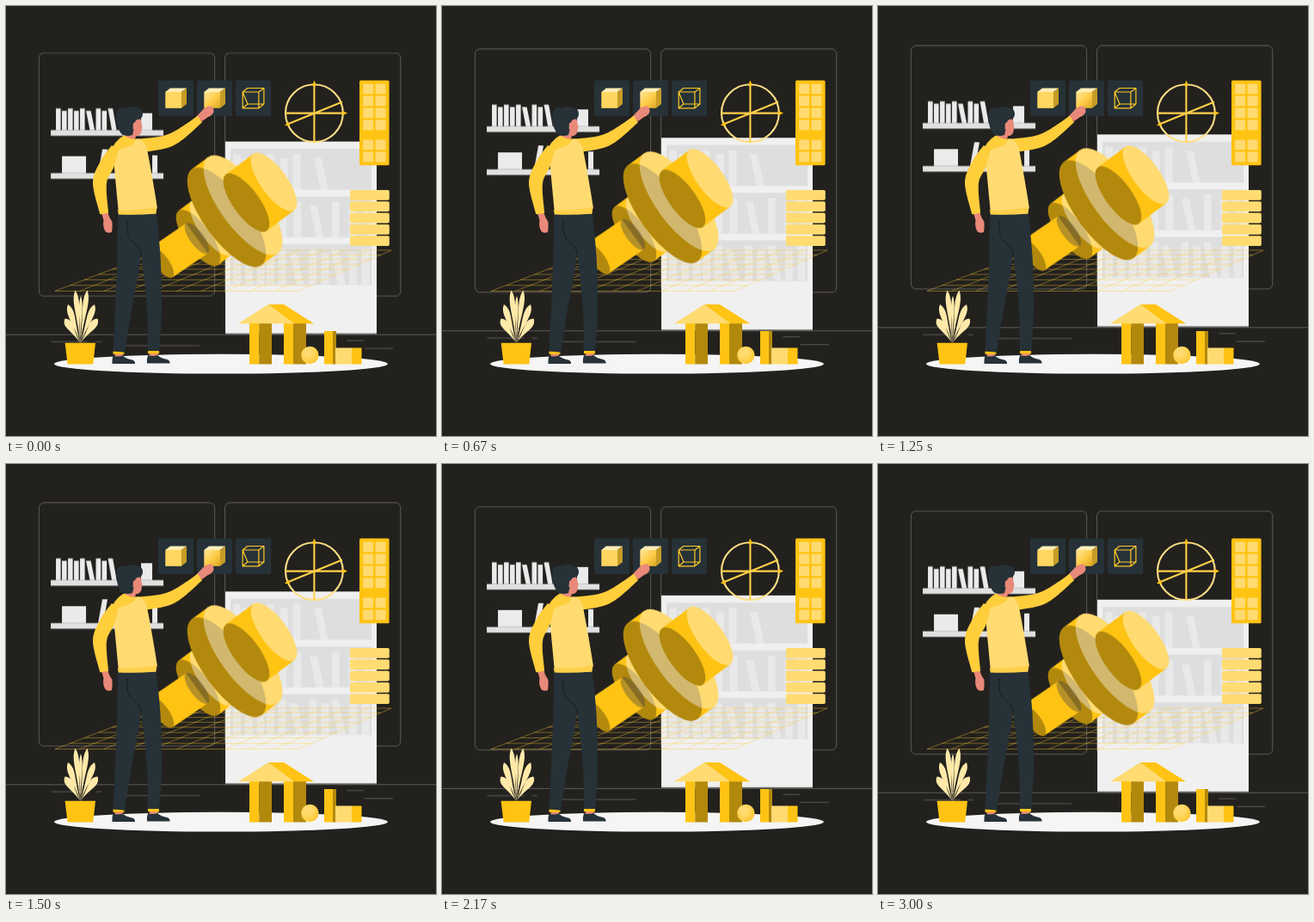
Write an HTML page that moves like this. It is 500 by 500 pixels and loops after 3040 ms.

```html
<!DOCTYPE html>
<html lang="en">
<head>
<meta charset="utf-8">
<title>3D modelling</title>
<style>
html, body { margin: 0; width: 100%; height: 100%; overflow: hidden; background: #23211e; }
svg { display: block; width: 100vw; height: 100vh; }
.float { animation: float 3040ms linear infinite; }
@keyframes float {
  0% { transform: translateY(-.3px); }
  47.86% { transform: translateY(-10px); }
  97.2% { transform: translateY(0); }
  100% { transform: translateY(-.57px); }
}
.y { fill: #ffc313; }
.pale { fill: #ffdb71; }
.dark { fill: #b3890d; }
.ink { fill: #263238; }
.skin { fill: #e98979; }
.sleeve { fill: #ffce3b; }
</style>
</head>
<body>
<svg viewBox="0 0 500 500">
  <defs>
    <radialGradient id="ball" cx=".38" cy=".35" r=".65">
      <stop offset=".3" stop-color="#ffdb71"/><stop offset="1" stop-color="#ffc935"/>
    </radialGradient>
    <linearGradient id="shine" x2="1" y2="1">
      <stop offset=".1" stop-color="#ffe08a"/><stop offset=".55" stop-color="#ffcb45"/><stop offset="1" stop-color="#d9a727"/>
    </linearGradient>
  </defs>

  <g class="float">
    <g fill="none" stroke="#ebebeb" stroke-width=".3">
      <rect x="38.4" y="54.9" width="204.2" height="282.8" rx="5.7"/>
      <rect x="254.6" y="54.9" width="204.2" height="282.8" rx="5.7"/>
      <path d="M0 382.5H500M416.8 398.6h33.1M322.5 401.3h8.7M396.6 389.4h19.2M52.5 390.9h43.2M104.6 390.9h6.3M131.5 395.2h93.7"/>
    </g>
    <g id="shelves"></g>
    <g id="bookcase"></g>
  </g>

  <path id="grid" fill="none" stroke="#ffcb38" stroke-width=".5" opacity=".8"/>
  <ellipse cx="250" cy="416.2" rx="194" ry="11.4" fill="#f5f5f5"/>

  <g id="blocks"></g>
  <path class="pale" d="M270 369.3 305 347 335 369.3Z"/>
  <path class="y" d="M305 347H323L358 369.3H335Z"/>
  <circle cx="353.4" cy="406" r="10.2" fill="url(#ball)"/>

  <g id="tiles"></g>

  <g fill="none" stroke="#ffdf85" stroke-width="2.1">
    <circle cx="358.4" cy="124.6" r="33.4"/>
    <path stroke="#ffd04a" d="M326 138 391 111.5M358.4 90V158M325 124.6H393"/>
    <path class="y" stroke="none" d="M358.4 86.5 361 92.5H356ZM397 124.6 391.5 127.2V122ZM324 139 328.3 134.6 330.2 139.2Z"/>
  </g>

  <rect class="y" x="411" y="86.5" width="34.6" height="98.7" rx="1.5"/>
  <g id="panel" class="pale"></g>

  <g id="bolt" class="float"></g>

  <path id="leaves" fill="#ffe9a8"/>
  <path class="y" d="M68.6 391.8H104L101.3 416.5H71.6Z"/>

  <g>
    <g id="legs"></g>
    <path fill="none" stroke="#151f25" d="M141 249Q139 268 148 275 155 279 157.8 289"/>
    <path class="skin" d="M111 241 118 239.5Q120 246 123.5 251 124 257 123 263 118 265 115.5 262 112 256 113.5 249Z"/>
    <path class="skin" d="M221 129 230 119.5Q236 115.5 239 116.5 242 119 241.5 123 240 127 235 129L228 134Z"/>
    <path class="skin" d="M139 138 152 140 150.5 154Q144 158 138 154Z"/>
    <path id="rightArm" class="sleeve"/>
    <path class="pale" d="M124 167Q128 157 140 155L155 154.5Q162 157 164.5 169 171 203 175.8 234L174 241.5H131Q127 200 124 167Z"/>
    <path fill="#ffd04a" d="M129.7 237.5Q153 238 175.3 234L174.3 241.5Q152 243.5 131 242.5Z"/>
    <path id="leftArm" class="sleeve"/>
    <path class="sleeve" d="M137 150.5Q145 155 151 155 150 162 139 164.5 130 168 122 170 125.500 157 137 150.5Z"/>
    <path class="skin" d="M147 131Q154 128 156.5 132L158.6 141Q157.500 143 157.5 146 156.5 151.5 149.5 151.3L145 148Z"/>
    <path class="ink" d="M128.500 124Q130 117.500 139 118.500 147 115.500 153 118.500 159.500 120 159 126 158.800 131.500 153 132 149.500 133 149 139 148.500 145 147 150 141 152 135 149.500 130 144 129 136 127.500 130 128.500 124Z"/>
    <path class="skin" d="M148 136Q152 134.500 152 139 151 143.500 147.500 143Z"/>
  </g>
</svg>
<script>
const $ = id => document.getElementById(id);
const times = (n, fn) => Array.from({ length: n }, (_, i) => fn(i)).join('');
const mix = (a, b, k) => a + (b - a) * k;
const path = (d, look) => `<path d="${d}" ${look}/>`;
const rect = (x, y, w, h, look = '', r = 0) =>
  `<rect x="${x}" y="${y}" width="${w}" height="${h}" rx="${r}" ${look}/>`;

let seed = 7;
const random = () => (seed = seed * 16807 % 2147483647) / 2147483647;

// A row of books with alternating heights, where every third one leans
function books(floor, x, end, w, h, gap, tilt) {
  let d = '';
  for (let i = 0; x + w < end; i++) {
    const lean = i > 4 && i % 3 === 2 ? -tilt : 0;
    x -= lean;
    d += `M${x} ${floor}h${w}l${lean} ${-h * (i % 2 ? 1 : 1.12)}h${-w}Z`;
    x += w + gap();
  }
  return d;
}

$('shelves').innerHTML =
  times(2, i => rect(52, 144.7 + 50 * i, 131, 6.6, 'fill="#e0e0e0"')) +
  path(books(144.7, 58, 130, 5.6, 22.5, () => 1.4, 4.5) +
    'M157 144.7V125H170V144.7ZM65 194.7V175H93V194.7ZM107 194.7 112 167H118L113 194.7ZM170 194.7V174H176V194.7Z',
    'fill="#ebebeb"');

$('bookcase').innerHTML =
  rect(255, 158, 176, 223, 'fill="#f0f0f0"') +
  rect(255, 380.6, 176, .8, 'fill="#dedede"') +
  times(3, i => {
    const floor = 214 + 55.4 * i;
    return rect(261, floor - 47.5, 164, 47.5, 'fill="#dedede"') +
      path(books(floor, 264, 425 - 50 * (i < 1), 9, 37, () => 2 + random() * (18 - 7 * i), 8), 'fill="#e9e9e9"');
  });

// Floor grid in perspective
$('grid').setAttribute('d',
  times(11, i => `M${mix(57, 340, i / 10)} 331.5L${mix(181, 448, i / 10)} 284`) +
  times(9, i => {
    const k = i / 8 * (1.14 - .14 * i / 8);
    return `M${mix(57, 181, k)} ${mix(331.5, 284, k)}H${mix(340, 448, k)}`;
  }));

// Two-tone blocks standing on the floor
const block = (x, top, front, side, tones = ['y', 'dark']) =>
  rect(x, top, front, 416.5 - top, `class="${tones[0]}"`) +
  rect(x + front, top, side, 416.5 - top, `class="${tones[1]}"`);
$('blocks').innerHTML = block(283, 369, 11.3, 14.7) + block(323, 369, 11, 15) +
  block(370, 378, 10, 4) + block(383, 397.5, 19, 16, ['pale', 'y']).replace('width="16"', 'width="11.5"');

const solidCube = (x, front) =>
  rect(x, 100, 18.7, 18.8, `fill="${front}"`) +
  path(`M${x} 100l5.7-4.5h19l-6 4.5z`, 'fill="#ffedb5"') +
  path(`M${x + 18.7} 100l6-4.5v18.500l-6 4.800z`, 'fill="#c79c27"');
const wireCube = x => path(
  `M${x} 100h18.7v18.8h-18.7zl5.7-4.5h19v18.5h-19zM${x + 18.7} 100l6-4.5m0 18.500l-6 4.800m-18.7 0l5.7-4.8`,
  'fill="none" stroke="#ffc828" stroke-width="1.2" stroke-linejoin="round"');
$('tiles').innerHTML = times(3, i => rect(177 + 45 * i, 86.5, 41, 41.5, 'class="ink"', 1.5)) +
  solidCube(185.3, '#ffd65f') + solidCube(230.3, 'url(#shine)') + wireCube(275.2);

$('panel').innerHTML =
  times(12, i => {
    const row = i >> 1;
    return rect(415.2 + i % 2 * 14.4, 90.5 + row * 14 + (row > 3) * 9, 11.8, 11.8, '', .8);
  }) +
  times(5, i => rect(400, 213.9 + i * 13.35, 45.8, 11.8, '', 1.8));

// Leaves fan out in mirrored pairs, shorter towards the outside
function leaf(x, y, w) {
  const bx = 86.5, by = 392, dx = x - bx, dy = y - by, n = w / Math.hypot(dx, dy);
  const at = (k, s) => `${bx + dx * k - dy * n * s} ${by + dy * k + dx * n * s}`;
  return `M${bx} ${by}C${at(.55, .1)} ${at(.8, 1.3)} ${x} ${y}C${at(.8, -1.3)} ${at(.55, -.1)} ${bx} ${by}Z`;
}
$('leaves').setAttribute('d', leaf(87, 337, 3) + times(6, i => {
  const ring = i >> 1, side = i % 2 * 2 - 1;
  return leaf(87.5 + side * (7 + 8.5 * Math.sqrt(ring)), 330.5 + 16.5 * ring, 5 + ring);
}));

// Tapered limb through a few [x, y, width] points
function limb(points) {
  const sides = points.map(([x, y, w], i) => {
    const [ax, ay] = points[Math.max(i - 1, 0)], [bx, by] = points[Math.min(i + 1, points.length - 1)];
    const n = w / 2 / Math.hypot(bx - ax, by - ay), nx = (ay - by) * n, ny = (bx - ax) * n;
    return [[x + nx, y + ny], [x - nx, y - ny]];
  });
  const curve = line => line.slice(1).map((p, i) => {
    const a = line[i], before = line[i - 1] || a, after = line[i + 2] || p;
    return `C${a.map((v, k) => v + (p[k] - before[k]) / 6)} ${p.map((v, k) => v - (after[k] - a[k]) / 6)} ${p}`;
  }).join('');
  const left = sides.map(s => s[0]), right = sides.map(s => s[1]).reverse();
  return `M${left[0]}${curve(left)}L${right[0]}${curve(right)}Z`;
}
$('rightArm').setAttribute('d', limb([[149, 163, 16], [191, 156, 14.5], [225.5, 131.5, 9]]));
$('leftArm').setAttribute('d', limb([[127, 164, 9], [117.5, 184, 17], [109, 206, 16], [114.300, 241.500, 10]]));

// Ankle, sock and shoe
const foot = (x, y) =>
  rect(x + 2, y, 9.5, 8, 'class="skin"') +
  rect(x, y - .5, 13, 3.3, 'class="y"') +
  path(`M${x} ${y + 4.5}q5.500 2 11 0 4.500 4 11.500 5 3.500 1.500 3 4.500h-26.500q-.500-5 1-9.500Z`, 'class="ink"');
$('legs').innerHTML = foot(124.500, 402) + foot(165, 401.500) +
  path(limb([[142, 240, 24], [143, 290, 27], [136.500, 352, 19], [131.300, 402, 13.500]]), 'class="ink"') +
  path(limb([[162, 240, 25], [168.500, 290, 22], [172.500, 352, 17], [171.600, 401, 13.500]]), 'class="ink"');

// Cylinder between two equal tilted ellipses: body, shaded near end, tinted far end
const TILT = 54, RATIO = .38;
function cylinder(x, y, dx, dy, a, tint = '#fff', glow = .4, closed = true) {
  const b = a * RATIO, t = TILT * Math.PI / 180, c = Math.cos(t), s = Math.sin(t);
  const u = dx * c + dy * s, v = dy * c - dx * s;
  const k = Math.hypot(a * v, b * u), px = -a * a * v / k, py = b * b * u / k;
  const oval = (ox, oy, look) => `<ellipse cx="${ox}" cy="${oy}" rx="${a}" ry="${b}" ${look}/>`;
  return `<g transform="translate(${x} ${y}) rotate(${TILT})" class="y">` +
    (closed ? oval(u, v, '') : '') +
    path(`M${px} ${py}L${px + u} ${py + v}L${u - px} ${v - py}L${-px} ${-py}Z`, '') +
    oval(0, 0, 'class="dark"') + oval(u, v, `fill="${tint}" fill-opacity="${glow}"`) + '</g>';
}
$('bolt').innerHTML =
  cylinder(223.5, 270, 16, -12, 39) +
  cylinder(181, 298.5, 41, -28, 21.5, '#40404a', .38, false) +
  cylinder(256.5, 246, 19, -14, 69) +
  cylinder(279.5, 229, 32, -24, 40.5);
</script>
</body>
</html>
```
